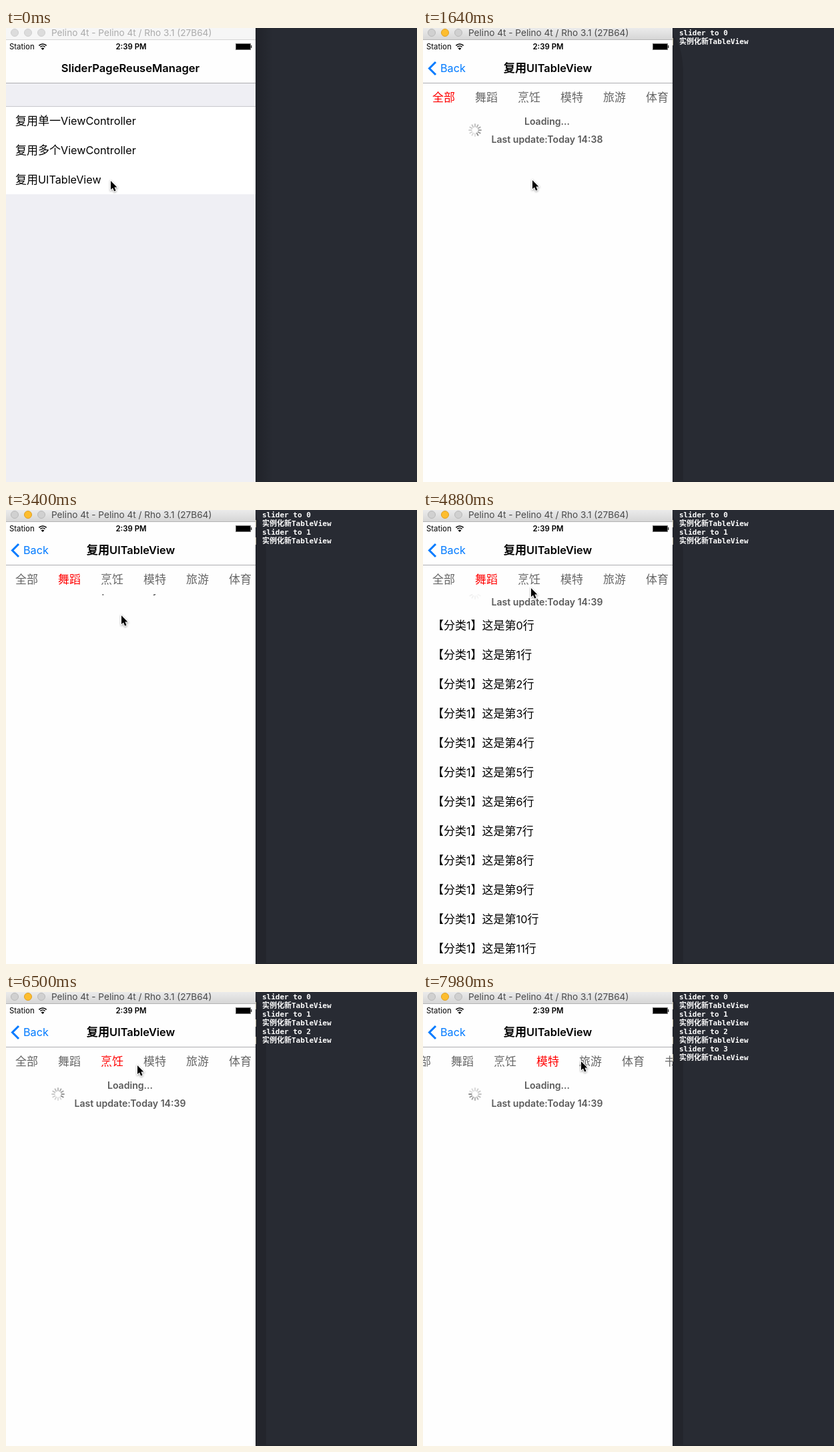
An HTML page with a canvas that plays this animation: 616 by 680 pixels, repeating every 8000 ms.

```html
<!DOCTYPE html>
<html lang="zh">
<head>
<meta charset="utf-8">
<style>
html, body { margin: 0; width: 100%; height: 100%; overflow: hidden; background: #282b33; }
canvas { display: block; }
</style>
</head>
<body>
<canvas id="stage" width="616" height="680"></canvas>
<script>
const ctx = document.getElementById('stage').getContext('2d');
const LOOP = 8000, FIRST = 891, STEP = 147.5;
const PHONE_W = 374, TAB_BOTTOM = 126, HEADER_H = 54, REST = 21, ROW_H = 44;
const LATIN = 'Inter, "Liberation Sans", sans-serif';
const CJK = '"Noto Sans CJK SC", "Noto Sans CJK", sans-serif';
const MONO = '"DejaVu Sans Mono", "Noto Sans CJK SC", monospace';
const MENU = ['复用单一ViewController', '复用多个ViewController', '复用UITableView'];
const TABS = ['全部', '舞蹈', '烹饪', '模特', '旅游', '体育', '书法'];

const PAGES = [
  { start: 2, loaded: 9 },
  { start: 16, loaded: 24.54 },
  { start: 31, loaded: 38.2 },
  { start: 44, loaded: 99 }
];
const POINTER = [
  [-1, 157, 229], [5, 164, 228], [10, 167, 229], [13, 150, 195], [15, 112, 128],
  [16, 104, 110], [17, 173, 158], [24, 170, 150], [27, 162, 117], [30, 162, 112],
  [38, 197, 110], [41, 215, 106], [44, 222, 104], [47, 237, 104], [99, 237, 104]
];

const clamp = x => Math.max(0, Math.min(1, x));
const smooth = x => { x = clamp(x); return x * x * (3 - 2 * x); };

function rect(x, y, w, h, color) {
  ctx.fillStyle = color;
  ctx.fillRect(x, y, w, h);
}

function disc(x, y, r, fill, stroke) {
  ctx.beginPath();
  ctx.arc(x, y, r, 0, 7);
  ctx.fillStyle = fill;
  ctx.fill();
  ctx.strokeStyle = stroke;
  ctx.lineWidth = 1;
  ctx.stroke();
}

function path(points, color, width) {
  ctx.beginPath();
  points.forEach(([x, y]) => ctx.lineTo(x, y));
  ctx.strokeStyle = color;
  ctx.lineWidth = width;
  ctx.stroke();
}

// Latin and Chinese runs use their own face; y is the baseline.
function text(str, x, y, size, color, { weight = 400, align = 'left' } = {}) {
  const runs = str.match(/[\x00-\x7f]+|[^\x00-\x7f]+/g).map(s => {
    const latin = s.charCodeAt(0) < 128;
    const font = `${weight} ${latin ? size * 0.953 : size}px ${latin ? LATIN : CJK}`;
    ctx.font = font;
    return { s, font, w: ctx.measureText(s).width };
  });
  if (align === 'center') x -= runs.reduce((sum, r) => sum + r.w, 0) / 2;
  ctx.fillStyle = color;
  for (const r of runs) {
    ctx.font = r.font;
    ctx.fillText(r.s, x, y);
    x += r.w;
  }
}

function clipped(x, y, w, h, draw) {
  ctx.save();
  ctx.beginPath();
  ctx.rect(x, y, w, h);
  ctx.clip();
  draw();
  ctx.restore();
}

function drawConsole(k, active) {
  rect(PHONE_W, 0, 616 - PHONE_W, 680, '#282b33');
  const shade = ctx.createLinearGradient(PHONE_W, 0, 400, 0);
  shade.addColorStop(0, 'rgba(0,0,0,.2)');
  shade.addColorStop(1, 'rgba(0,0,0,0)');
  if (active) {
    ctx.beginPath();
    ctx.moveTo(374, 0);
    ctx.lineTo(376, 12);
    ctx.quadraticCurveTo(390, 30, 390, 70);
    ctx.lineTo(390, 680);
    ctx.lineTo(374, 680);
    ctx.fillStyle = 'rgba(0,0,0,.13)';
    ctx.fill();
  } else {
    rect(PHONE_W, 0, 26, 680, shade);
  }
  rect(PHONE_W, 678, 616 - PHONE_W, 2, '#24272e');
  PAGES.filter(p => k >= p.start).forEach((p, i) => {
    const y = 11 + i * 26;
    ctx.font = `bold 11px ${MONO}`;
    ctx.fillStyle = '#fff';
    ctx.fillText('slider to ' + i, 384, y);
    ctx.fillText('实例化新TableView', 384, y + 13);
    rect(374, y + 4, 1, 11, '#b5ae98');
  });
}

function drawWindowBar(active) {
  const bar = ctx.createLinearGradient(0, 0, 0, 17);
  bar.addColorStop(0, active ? '#ebebeb' : '#f6f6f6');
  bar.addColorStop(1, active ? '#d6d6d6' : '#f6f6f6');
  rect(0, 0, PHONE_W, 17, bar);
  rect(0, 17, PHONE_W, 1, active ? '#b4b4b4' : '#d4d4d4');
  [13, 33, 53].forEach((x, i) => {
    const lit = active && i === 1;
    disc(x, 7, 5.5, lit ? '#fdbd2f' : active ? '#d0d0d0' : '#dcdcdc',
      lit ? '#dfa023' : active ? '#b9b9b9' : '#cfcfcf');
  });
  text('Pelino 4t - Pelino 4t / Rho 3.1 (27B64)', 68, 12, 14.3, active ? '#4a4a4a' : '#ababab');
}

function drawStatus() {
  text('Station', 5, 32, 12, '#000');
  text('2:39 PM', 187.5, 32, 12, '#000', { weight: 600, align: 'center' });
  ctx.strokeStyle = '#000';
  ctx.lineWidth = 1.6;
  for (const r of [8, 5]) {
    ctx.beginPath();
    ctx.arc(55, 32, r, -2.35, -0.79);
    ctx.stroke();
  }
  ctx.beginPath();
  ctx.moveTo(55, 33);
  ctx.arc(55, 33, 3.4, -2.35, -0.79);
  ctx.fillStyle = '#000';
  ctx.fill();
  ctx.lineWidth = 1;
  ctx.strokeStyle = '#777';
  ctx.strokeRect(344.5, 23.5, 22, 9);
  rect(345, 24, 21, 8, '#000');
  rect(367, 26, 1.4, 4, '#333');
}

function drawNav(push) {
  rect(0, 18, PHONE_W, 64, '#fefefe');
  drawStatus();
  const title = { weight: 600, align: 'center' };
  if (push < 1) {
    ctx.globalAlpha = 1 - push;
    text('SliderPageReuseManager', 186.5 - 110 * push, 66, 17.4, '#000', title);
  }
  if (push > 0) {
    ctx.globalAlpha = push;
    text('复用UITableView', 187 + 187 * (1 - push), 66, 17.2, '#000', title);
    path([[19, 51], [9.5, 60.5], [19, 70]], '#007aff', 3);
    text('Back', 26 + 80 * (1 - push), 66, 17, '#007aff');
  }
  ctx.globalAlpha = 1;
  rect(0, 82, PHONE_W, 1, '#adadb0');
}

function drawMenu(pressed) {
  rect(0, 83, PHONE_W, 597, '#efeff4');
  rect(0, 117, PHONE_W, 1, '#c8c7cc');
  rect(0, 118, PHONE_W, 131, '#fff');
  if (pressed) rect(0, 206, PHONE_W, 43, '#d9d9d9');
  MENU.forEach((label, i) => text(label, 14, 145 + i * ROW_H, 17, '#000'));
}

function drawSpinner(x, y, turn, alpha) {
  for (let i = 0; i < 12; i++) {
    const a = i * Math.PI / 6, lag = (turn - i + 1200) % 12;
    const dx = Math.sin(a), dy = -Math.cos(a);
    ctx.globalAlpha = alpha * (0.25 + 0.6 * Math.pow(1 - lag / 12, 1.6));
    ctx.lineCap = 'round';
    path([[x + dx * 5.2, y + dy * 5.2], [x + dx * 9, y + dy * 9]], '#777', 1.8);
  }
  ctx.lineCap = 'butt';
  ctx.globalAlpha = 1;
}

function drawList(k, index) {
  const { start, loaded } = PAGES[index];
  const since = k - loaded, done = since >= 0;
  const decay = done ? Math.exp(-0.857 * since) : 1;
  const reveal = done
    ? REST + (HEADER_H - REST) * decay
    : HEADER_H * smooth((k - start - 0.6) / 1.8);
  const top = TAB_BOTTOM - HEADER_H + reveal;
  const bold = { weight: 600, align: 'center' };
  if (!done) text('Loading...', 186, top + 19, 14.8, '#5a5a5a', bold);
  const minute = index === 0 && !done ? 38 : 39;
  text('Last update:Today 14:' + minute, 186, top + 46, 14.8, '#5a5a5a', bold);
  drawSpinner(78, top + 27, Math.floor(k * 1.77) + 9, decay);
  if (!done) return;
  for (let i = 0; i < 13; i++) {
    text(`【分类${index}】这是第${i}行`, 14, TAB_BOTTOM + reveal + 28 + i * ROW_H, 17, '#000');
  }
}

function drawPage(k) {
  const index = Math.max(0, PAGES.findLastIndex(p => k >= p.start));
  const scroll = 36 * smooth((k - PAGES[3].start + 1) / 3);
  rect(0, 83, PHONE_W, 597, '#fefefe');
  TABS.forEach((label, i) =>
    text(label, 14 + i * 64 - scroll, 110, 17, i === index ? '#f00' : '#666'));
  clipped(0, TAB_BOTTOM, PHONE_W, 680 - TAB_BOTTOM, () => drawList(k, index));
}

function drawPointer(k) {
  const n = POINTER.findIndex(p => p[0] > k);
  const [a, b] = [POINTER[n - 1], POINTER[n]];
  const u = (k - a[0]) / (b[0] - a[0]);
  ctx.save();
  ctx.translate(a[1] + (b[1] - a[1]) * u, a[2] + (b[2] - a[2]) * u);
  ctx.beginPath();
  [[0, 0], [0, 13], [3, 10.4], [5.2, 15.4], [7.6, 14.4], [5.4, 9.6], [9.4, 9.4]]
    .forEach(([x, y]) => ctx.lineTo(x, y));
  ctx.closePath();
  ctx.shadowColor = 'rgba(0,0,0,.4)';
  ctx.shadowBlur = 3;
  ctx.shadowOffsetY = 1;
  ctx.strokeStyle = '#fff';
  ctx.lineWidth = 2;
  ctx.stroke();
  ctx.shadowColor = 'transparent';
  ctx.fillStyle = '#000';
  ctx.fill();
  ctx.restore();
}

function render(t) {
  const k = Math.max(-1, Math.floor((t - FIRST) / STEP));
  const active = k >= 0;
  const push = smooth((k - 0.6) / 3);
  drawConsole(k, active);
  clipped(0, 0, PHONE_W, 680, () => {
    ctx.save();
    ctx.translate(-112 * push, 0);
    if (push < 1) drawMenu(active);
    ctx.restore();
    if (push > 0) {
      ctx.save();
      ctx.translate(PHONE_W * (1 - push), 0);
      drawPage(k);
      ctx.restore();
    }
    drawNav(push);
    drawWindowBar(active);
  });
  drawPointer(k);
}

const began = performance.now();
function tick() {
  render((performance.now() - began) % LOOP);
  requestAnimationFrame(tick);
}
tick();
</script>
</body>
</html>
```
